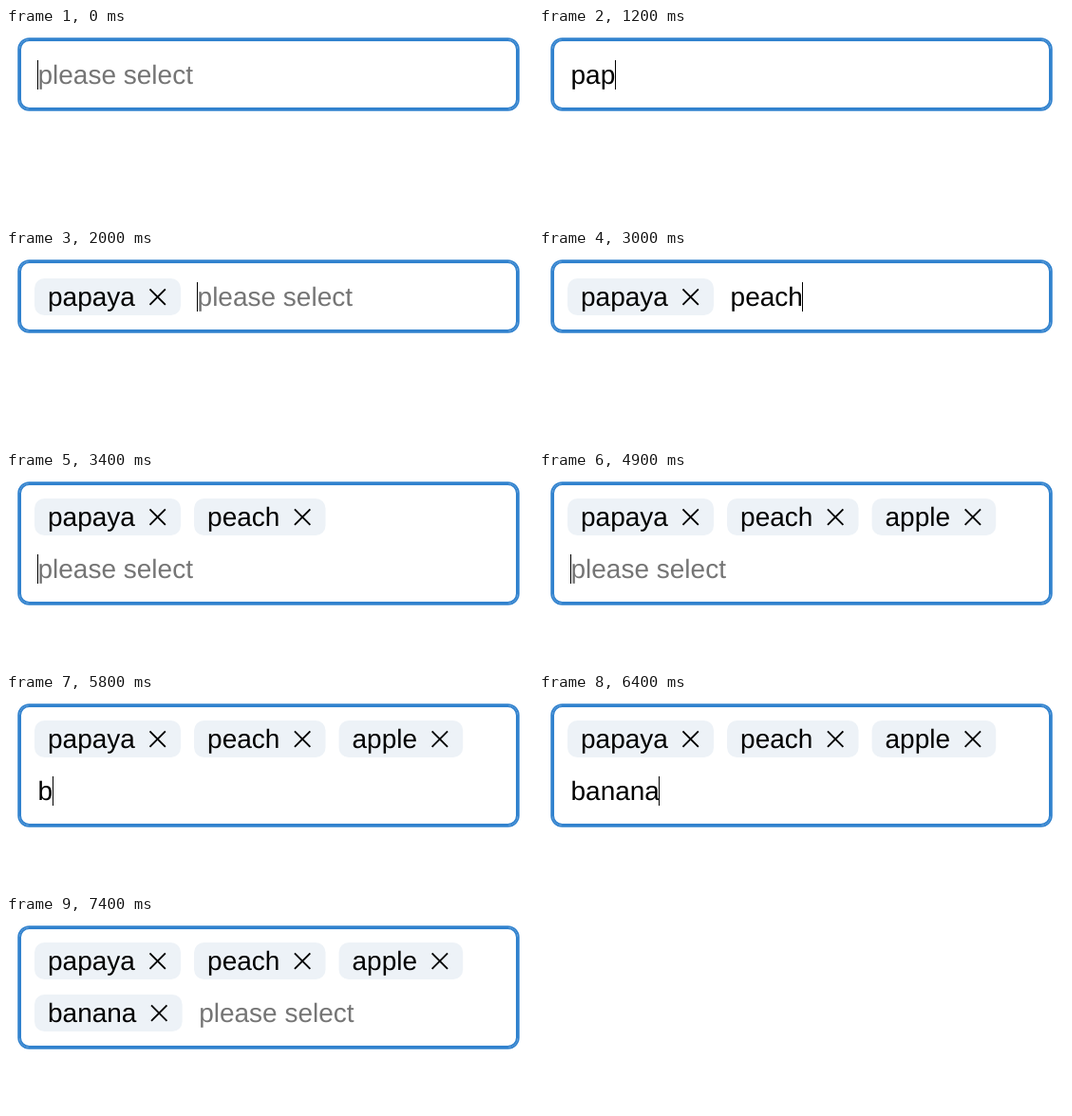
Write an HTML page with a canvas that moves like this. It is 555 px wide and 205 px high and loops after 8 s.

```html
<!DOCTYPE html>
<html lang="en">
<head>
<meta charset="utf-8">
<style>
html, body { margin: 0; height: 100%; overflow: hidden; background: #fff; }
canvas { display: block; }
</style>
</head>
<body>
<canvas id="stage" width="555" height="205"></canvas>
<script>
const ctx = document.getElementById('stage').getContext('2d');
const LOOP = 8000, TICK = 100, BLINK = 600;
const GAP = 14, LEFT = 30, INSET = 3.5, ROW = 55, RADIUS = 10.5;
const BLUE = '#3182ce', CHIP = '#edf2f7', HINT = '#757575';

// start: empty field appears; typeAt: first key; keys: one stroke per tick, "-" is a pause.
const rounds = [
  { start: 0, typeAt: 1000, keys: 'p a p a - - y a' },
  { start: 2000, typeAt: 2300, keys: 'pe - - a - c - h' },
  { start: 3400, typeAt: 4000, keys: 'a p p - l e' },
  { start: 4900, typeAt: 5800, keys: 'b a n a - n a' },
  { start: 6800, typeAt: LOOP, keys: '' }
];

function typedBy(round, t) {
  const ticks = Math.max(0, Math.floor((t - round.typeAt) / TICK) + 1);
  return round.keys.split(' ').slice(0, ticks).join('').replaceAll('-', '');
}

function text(str, x, y, color) {
  ctx.fillStyle = color;
  ctx.fillText(str, x, y);
}

// Fills the band between a rounded box grown by `outer` and by `inner`.
function drawRing(height, outer, inner) {
  ctx.fillStyle = BLUE;
  ctx.beginPath();
  for (const d of [outer, inner])
    ctx.roundRect(14 - d, 12 - d, 525 + 2 * d, height + 2 * d, RADIUS + d);
  ctx.fill('evenodd');
}

// Draws a chip and returns the x where the next item starts.
function drawChip(word, x, y) {
  const w = ctx.measureText(word).width + 62.2;
  ctx.fillStyle = CHIP;
  ctx.beginPath();
  ctx.roundRect(x, y, w, 39, RADIUS);
  ctx.fill();
  text(word, x + GAP, y + 29, '#000');

  const cx = x + w - 24.4, cy = y + 19.6, r = 8.2;
  ctx.strokeStyle = '#000';
  ctx.lineWidth = 1.9;
  ctx.beginPath();
  for (const s of [-r, r]) {
    ctx.moveTo(cx - r, cy - s);
    ctx.lineTo(cx + r, cy + s);
  }
  ctx.stroke();
  return x + w + GAP;
}

function draw(t) {
  const n = rounds.findLastIndex(r => t >= r.start);
  const wrapped = n > 1;
  const top = wrapped ? 28 : 30;
  const height = wrapped ? 127 : 74;

  ctx.clearRect(0, 0, 555, 205);
  ctx.font = '28px "Liberation Sans", Arial, sans-serif';
  ctx.textRendering = 'geometricPrecision';
  drawRing(height, 1.75, 0);
  drawRing(height, 0, -2);

  let x = LEFT, y = top;
  const newRow = () => { x = LEFT; y = top + ROW; };
  for (let i = 0; i < n; i++) {
    if (i === 3) newRow();
    x = drawChip(typedBy(rounds[i], LOOP), x, y);
  }
  if (wrapped && n < 4) newRow();

  x += INSET;
  const typed = typedBy(rounds[n], t);
  text(typed || 'please select', x, y + 29, typed ? '#000' : HINT);
  if (typed || t < rounds[n].start + BLINK) {
    ctx.fillStyle = '#000';
    ctx.fillRect(Math.floor(x + ctx.measureText(typed).width), y + 4, 1, 31);
  }
}

function tick() {
  draw(performance.now() % LOOP);
  requestAnimationFrame(tick);
}
tick();
</script>
</body>
</html>
```
